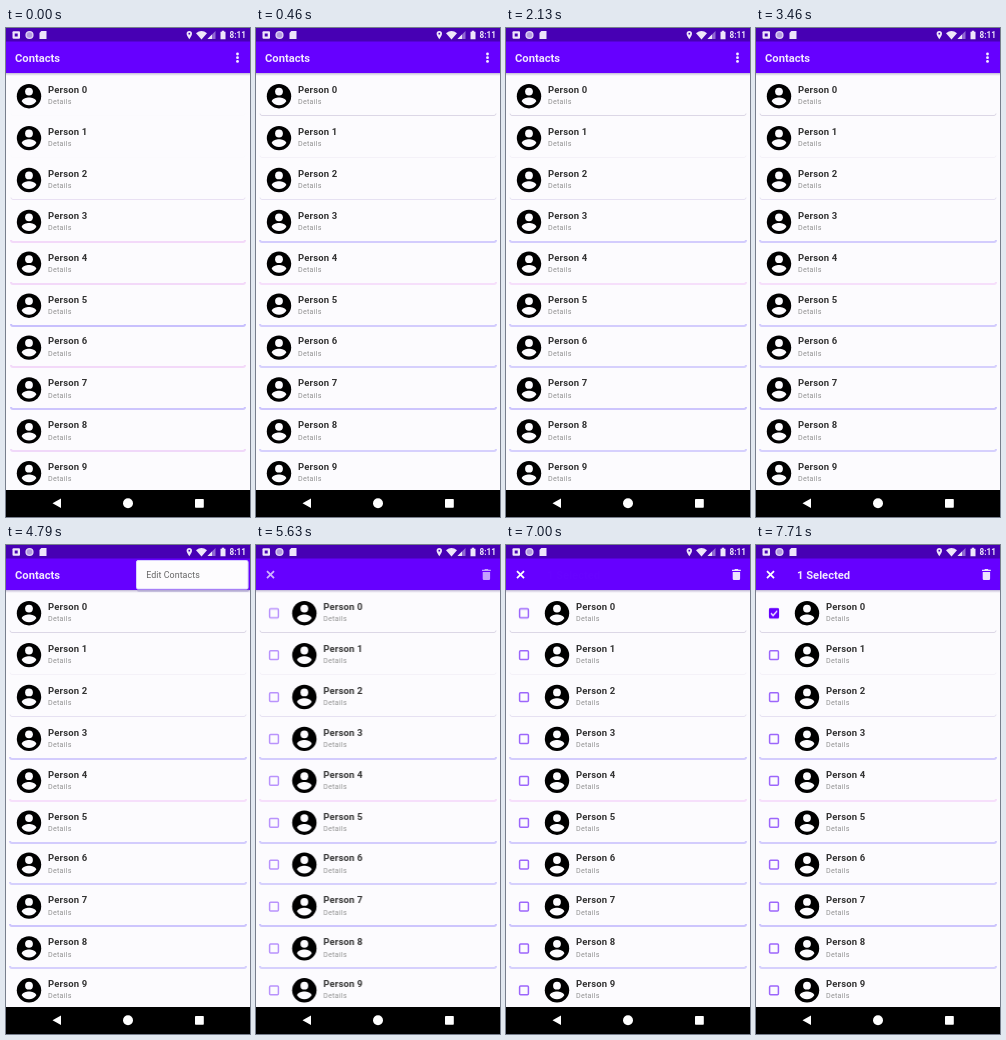
Animation, 244 px wide and 489 px high, one loop 8 s. Source, as an HTML page:

```html
<!DOCTYPE html>
<html lang="en">
<head>
<meta charset="utf-8">
<title>Contacts</title>
<style>
html, body { margin: 0; width: 100%; height: 100%; overflow: hidden; background: #fcfbfe; }
svg { display: block; width: 100vw; height: 100vh; }
text { font-family: Roboto, sans-serif; }
.title { font-size: 11.2px; font-weight: 700; fill: #f1e8ff; }
.name { font-size: 9.5px; font-weight: 600; letter-spacing: .17px; fill: #333; }
.details { font-size: 7.2px; letter-spacing: .23px; fill: #929292; }
.browse, .edit, .shift, .menu, .early, .late, .checked, .count {
  animation: 8s linear infinite both;
}
.browse { animation-name: browse; }
.edit { animation-name: edit; }
.shift { animation-name: shift; }
.menu { animation-name: menu; transform-origin: 242px 16px; }
.early { animation-name: early; }
.late { animation-name: late; }
.checked { animation-name: check; transform-box: fill-box; transform-origin: center; }
.count { animation-name: count; }
@keyframes browse { 0%, 67.5% { opacity: 1; } 70%, 100% { opacity: 0; } }
@keyframes edit { 0%, 67.8% { opacity: 0; } 71.5%, 100% { opacity: 1; } }
@keyframes shift {
  0%, 67.5% { transform: translateX(0); animation-timing-function: cubic-bezier(.4, 0, .2, 1); }
  72%, 100% { transform: translateX(28px); }
}
@keyframes menu {
  0%, 55.2% { opacity: 0; transform: scale(.45, .3); animation-timing-function: ease-out; }
  58%, 66.2% { opacity: 1; transform: none; }
  68.6% { opacity: 0; transform: none; }
  68.7%, 100% { opacity: 0; transform: scale(.45, .3); }
}
@keyframes early { 0%, 2% { opacity: 1; } 5%, 100% { opacity: 0; } }
@keyframes late { 0%, 2% { opacity: 0; } 5%, 100% { opacity: 1; } }
@keyframes check {
  0%, 87.5% { opacity: 0; transform: scale(.75); }
  89.3%, 100% { opacity: 1; transform: none; }
}
@keyframes count { 0%, 87.5% { opacity: 0; } 89%, 100% { opacity: 1; } }
</style>
</head>
<body>
<svg viewBox="0 0 244 489" preserveAspectRatio="none">
  <defs>
    <linearGradient id="shade" x2="0" y2="1">
      <stop stop-color="#a79bc4" stop-opacity=".75"/>
      <stop offset="1" stop-color="#c9c2da" stop-opacity="0"/>
    </linearGradient>
    <g id="avatar">
      <circle r="12.2"/>
      <circle cy="-4.6" r="3.9" fill="#fcfbfe"/>
      <path d="M-7.3 5C-7.3 2.5-2.4 1.2 0 1.2S7.3 2.5 7.3 5C5.700 7.500 3 9 0 9S-5.700 7.500-7.3 5Z" fill="#fcfbfe"/>
    </g>
    <rect id="box" x="-4.4" y="-4.4" width="8.8" height="8.8" rx="1" fill="none" stroke="#9c66fb" stroke-width="1.500"/>
  </defs>

  <rect width="244" height="489" fill="#fcfbfe"/>
  <g id="list"></g>

  <rect y="45" width="244" height="3" fill="url(#shade)"/>
  <rect y="13" width="244" height="32" fill="#6600ff"/>
  <rect width="244" height="13.5" fill="#4700b4"/>

  <!-- status bar -->
  <g fill="#eee6fa">
    <rect x="6.500" y="3.200" width="7.500" height="7.500" rx="1"/>
    <path d="M8.700 5.500h3v3h-3Z" fill="#4700b4"/>
    <circle cx="23.500" cy="7" r="3.400" fill="#b49be0" stroke="#e0d3f5" stroke-width="1.400"/>
    <path d="M35.300 3H40.500v8h-7V5Z"/>
    <path d="M183.300 11.200C182 9 180.600 7.500 180.600 5.700a2.700 2.700 0 0 1 5.400 0C186 7.500 184.600 9 183.300 11.200Z"/>
    <circle cx="183.300" cy="5.700" r=".9" fill="#4700b4"/>
    <path d="M190 5.200Q195.500 1 201 5.200L195.500 11.500Z"/>
    <path d="M209.500 3v8h-8Z" opacity=".45"/>
    <path d="M206 6.500V11h-4.500Z"/>
    <path d="M214.500 3.800h1.300V2.800h2.400v1h1.300V11.300h-5Z"/>
    <text x="223.500" y="10" font-size="8.200" font-weight="700">8:11</text>
  </g>

  <!-- toolbar -->
  <g class="browse" fill="#f6f0ff">
    <text class="title" x="9" y="34">Contacts</text>
    <circle cx="231.500" cy="26" r="1.400"/>
    <circle cx="231.500" cy="29.700" r="1.400"/>
    <circle cx="231.500" cy="33.400" r="1.400"/>
  </g>
  <g class="edit">
    <path d="M11 26.200l7 7m0-7l-7 7" stroke="#fff" stroke-width="1.800"/>
    <path d="M226 24.800h2.300l.7-.8h2.800l.7.8h2.300v1.300h-8.800ZM226.700 26.900h7.400v6.800q0 1.200-1.200 1.200h-5q-1.200 0-1.200-1.200Z" fill="#eee5ff"/>
  </g>
  <text class="title count" x="41" y="34">1 Selected</text>

  <g class="menu">
    <rect x="131" y="16.500" width="112" height="30.500" rx="2" fill="#8f84c4" opacity=".35"/>
    <rect x="130.500" y="15.500" width="111.500" height="28.500" rx="1.500" fill="#fdfcfe" stroke="#d9cfff"/>
    <text x="140.300" y="33" font-size="8.900" letter-spacing=".05" fill="#666">Edit Contacts</text>
  </g>

  <!-- navigation bar -->
  <rect y="462" width="244" height="27"/>
  <g fill="#fff">
    <path d="M55 470.500v9.600l-8.500-4.800Z"/>
    <circle cx="122" cy="475.300" r="5"/>
    <rect x="189" y="471" width="8.800" height="8.800" rx=".7"/>
  </g>
</svg>
<script>
const pitch = 41.9;
const settled = ["#dcd7e6", "#f4f1f8", "#e6e1f2", "#d3ccfd", "#f6dffb", "#d3ccfd", "#d6d0fd", "#cdc5fd", "#d6d0fd"];
const opening = ["#fbfafd", "#fbfafd", "#e9e0f3", "#f3d9f9", "#f3d9f9", "#c8c0fd", "#f3d9f9", "#cdc5fd", "#f0d8f9"];

const divider = (kind, x, y, color, width) =>
  color
    ? `<path class="${kind}" d="M${x} ${y - 2}q0 2 2 2H${242 - x}q2 0 2-2" fill="none" stroke="${color}" stroke-width="${width}"/>`
    : "";

const row = i => {
  const y = 68 + pitch * i;
  const width = i < 3 ? 1 : 2;
  const lineY = Math.round(87 + pitch * i) + width / 2;
  const mark = i ? "" : `<g class="checked">
    <rect x="-5" y="-5" width="10" height="10" rx="1.200" fill="#6600ff"/>
    <path d="M-3 0l2.100 2.200L3.200-2.400" fill="none" stroke="#fff" stroke-width="1.300"/></g>`;
  return `${divider("early", 5, lineY, opening[i], width)}${divider("late", 4, lineY, settled[i], width)}
    <g class="edit"><g transform="translate(18 ${y + .3})"><use href="#box"/>${mark}</g></g>
    <g class="shift">
      <use href="#avatar" x="23" y="${y + .2}"/>
      <text class="name" x="42" y="${y - 3}">Person ${i}</text>
      <text class="details" x="42" y="${y + 8.300}">Details</text>
    </g>`;
};

document.getElementById("list").innerHTML = Array.from({ length: 10 }, (_, i) => row(i)).join("");
</script>
</body>
</html>
```
